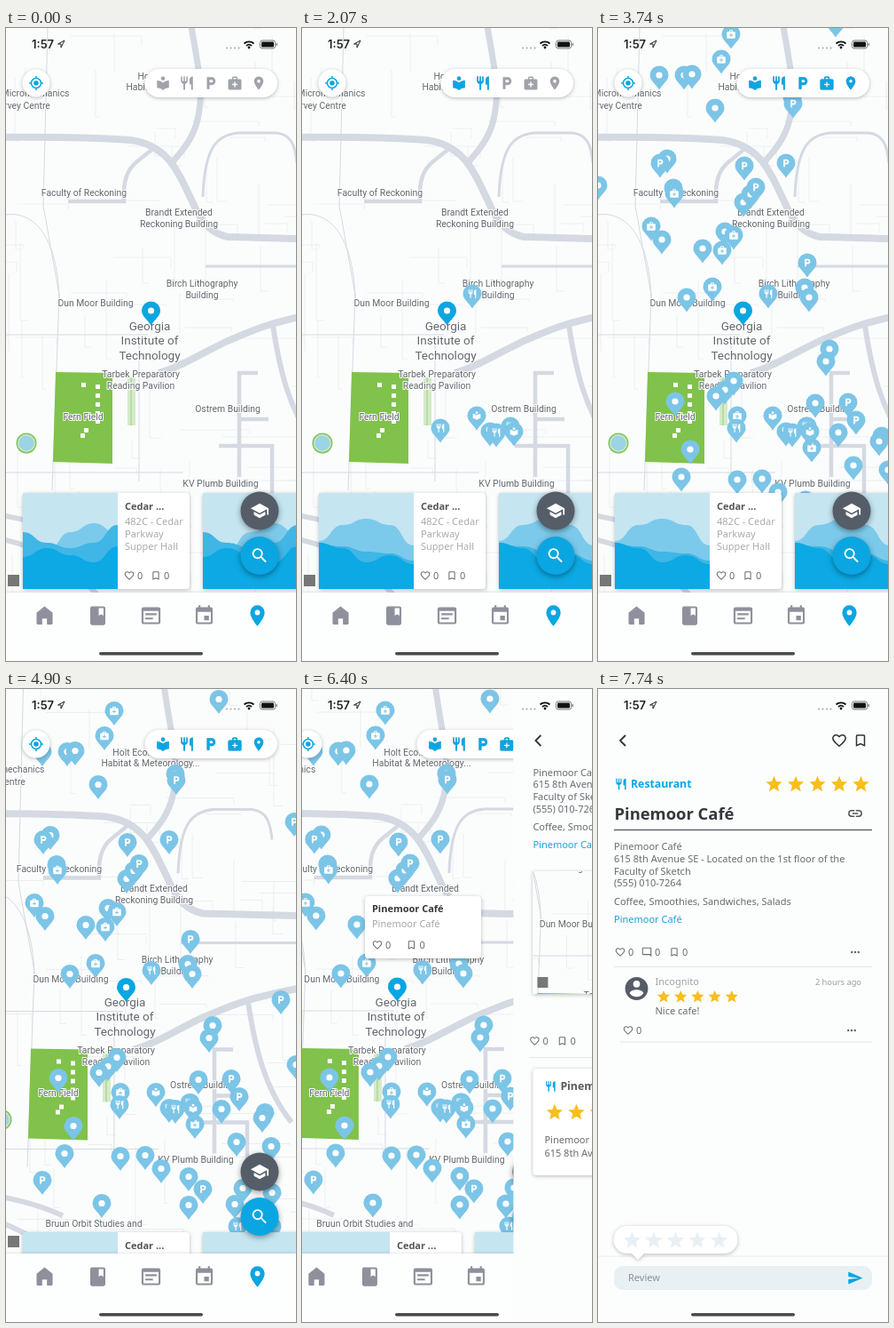
An HTML page for the animation above (8 s loop, 327 px wide and 712 px high).

```html
<!DOCTYPE html>
<html lang="en">
<head>
<meta charset="utf-8">
<title>Campus map</title>
<style>
html, body { margin: 0; height: 100%; overflow: hidden; background: #fbfdfd; }
svg { display: block; width: 100vw; height: 100vh; font: 11px "Noto Sans", "Open Sans", sans-serif; }
.map { font-family: Roboto, Arial, sans-serif; font-size: 10.4px; fill: #62676d; text-anchor: middle;
  paint-order: stroke; stroke: #fff; stroke-width: 2px; stroke-linejoin: round; }
.soft { filter: drop-shadow(0 1px 2px #0004); }
.fab { filter: drop-shadow(0 2px 3px #0006); }
</style>
</head>
<body>
<svg id="stage" viewBox="0 0 327 712" preserveAspectRatio="none"></svg>
<script>
const BLUE = '#0aa6e2', PALE = '#7cc5e7', GRAY = '#a0a3ab', TEXT = '#686b70', DARK = '#555d68', GOLD = '#f8be1b';

// Icons on a 24 unit grid
const ICONS = {
  lib: 'M12 11.5C9.6 9.3 6.5 8 3 8v11c3.5 0 6.6 1.3 9 3.5 2.4-2.2 5.5-3.5 9-3.5V8c-3.5 0-6.6 1.3-9 3.5zM12 8a3 3 0 1 0 0-6 3 3 0 0 0 0 6z',
  food: 'M11 9H9V2H7v7H5V2H3v7c0 2.1 1.7 3.8 3.8 4v9h2.5v-9C11.300 12.800 13 11.100 13 9V2h-2zm5-3v8h2.500v8H21V2c-2.800 0-5 2.200-5 4z',
  park: 'M13 3H6v18h4v-6h3a6 6 0 0 0 0-12zm.2 8H10V7h3.200a2 2 0 0 1 0 4z',
  med: 'M20 6h-4V4a2 2 0 0 0-2-2h-4a2 2 0 0 0-2 2v2H4a2 2 0 0 0-2 2v12a2 2 0 0 0 2 2h16a2 2 0 0 0 2-2V8a2 2 0 0 0-2-2zM10 4h4v2h-4zm6 11h-3v3h-2v-3H8v-2h3v-3h2v3h3z',
  place: 'M12 2a7 7 0 0 0-7 7c0 5.200 7 13 7 13s7-7.800 7-13a7 7 0 0 0-7-7zm0 9.500a2.500 2.500 0 1 1 0-5 2.500 2.500 0 0 1 0 5z',
  home: 'M12 2 3.500 9v11a1.500 1.500 0 0 0 1.500 1.500h4.500V15h5v6.500H19a1.500 1.500 0 0 0 1.500-1.500V9z',
  book: 'M18 2H6a2 2 0 0 0-2 2v16a2 2 0 0 0 2 2h12a2 2 0 0 0 2-2V4a2 2 0 0 0-2-2zm0 10-2.500-1.500L13 12V4h5z',
  note: 'M20 3H4a2 2 0 0 0-2 2v14a2 2 0 0 0 2 2h16a2 2 0 0 0 2-2V5a2 2 0 0 0-2-2zm0 16H4V7h16zM6 9.500h12v2H6zm0 4.500h8v2H6z',
  event: 'M17 12h-5v5h5zM16 1v2H8V1H6v2H5a2 2 0 0 0-2 2v14a2 2 0 0 0 2 2h14a2 2 0 0 0 2-2V5a2 2 0 0 0-2-2h-1V1zm3 18H5V8h14z',
  search: 'M15.500 14h-.8l-.3-.3a6.500 6.500 0 1 0-.7.7l.3.300v.8l5 5 1.500-1.500zm-6 0a4.500 4.500 0 1 1 0-9 4.500 4.500 0 0 1 0 9z',
  school: 'M5 13.200v4L12 21l7-3.800v-4L12 17zM12 3 1 9l11 6 9-4.900V17h2V9z',
  heart: 'M16.500 3A6 6 0 0 0 12 5.100 6 6 0 0 0 7.500 3C4.400 3 2 5.400 2 8.500c0 3.800 3.400 6.900 8.600 11.500l1.400 1.300 1.400-1.300C18.600 15.400 22 12.300 22 8.500 22 5.400 19.600 3 16.500 3zM12 18.700C7.100 14.200 4 11.400 4 8.500 4 6.500 5.500 5 7.500 5c1.500 0 3 1 3.600 2.400h1.800C13.500 6 15 5 16.500 5c2 0 3.500 1.500 3.500 3.500 0 2.900-3.100 5.700-8 10.200z',
  mark: 'M17 3H7a2 2 0 0 0-2 2v16l7-3 7 3V5a2 2 0 0 0-2-2zm0 15-5-2.200L7 18V5h10z',
  star: 'M12 17.300 18.200 21l-1.700-7L22 9.200l-7.200-.6L12 2 9.200 8.600 2 9.200 7.500 14l-1.700 7z',
  chat: 'M4 2h16a2 2 0 0 1 2 2v18l-4-4H4a2 2 0 0 1-2-2V4a2 2 0 0 1 2-2zm0 2v12h14.800l1.200 1.200V4z',
  link: 'M3.900 12A3.100 3.100 0 0 1 7 8.900h4V7H7a5 5 0 0 0 0 10h4v-1.900H7A3.100 3.100 0 0 1 3.900 12zM8 13h8v-2H8zm9-6h-4v1.900h4a3.100 3.100 0 0 1 0 6.200h-4V17h4a5 5 0 0 0 0-10z',
  more: 'M4 12a2 2 0 1 0 4 0 2 2 0 0 0-4 0zm6 0a2 2 0 1 0 4 0 2 2 0 0 0-4 0zm6 0a2 2 0 1 0 4 0 2 2 0 0 0-4 0z',
  user: 'M12 2a10 10 0 1 0 0 20 10 10 0 0 0 0-20zm0 3a3 3 0 1 1 0 6 3 3 0 0 1 0-6zm0 14.200c-2.500 0-4.700-1.300-6-3.200 0-2 4-3.100 6-3.100s6 1.100 6 3.100c-1.300 1.900-3.500 3.200-6 3.200z',
  send: 'M2 21 23 12 2 3v7l15 2-15 2z',
  edit: 'M3 17.200V21h3.800L17.800 9.900l-3.700-3.700zM20.700 7a1 1 0 0 0 0-1.400l-2.300-2.300a1 1 0 0 0-1.400 0l-1.900 1.800 3.800 3.800z'
};
const KINDS = ['lib', 'food', 'park', 'med', 'place'];

const icon = (name, x, y, size, fill = TEXT) =>
  `<path fill="${fill}" fill-rule="evenodd" transform="translate(${x - size / 2} ${y - size / 2}) scale(${size / 24})" d="${ICONS[name]}"/>`;
const text = (x, y, str, fill = TEXT, size = 11, extra = '') =>
  `<text x="${x}" y="${y}" fill="${fill}" font-size="${size}" ${extra}>${str}</text>`;
const bold = (x, y, str, fill, size) => text(x, y, str, fill, size, 'font-weight="700"');
const rect = (x, y, w, h, fill, r = 0, extra = '') =>
  `<rect x="${x}" y="${y}" width="${w}" height="${h}" rx="${r}" fill="${fill}" ${extra}/>`;
const circle = (x, y, r, fill, extra = '') => `<circle cx="${x}" cy="${y}" r="${r}" fill="${fill}" ${extra}/>`;
const line = (d, stroke, width) => `<path d="${d}" fill="none" stroke="${stroke}" stroke-width="${width}"/>`;
const group = (id, body, extra = '') => `<g id="${id}" ${extra}>${body}</g>`;
const lines = (x, y, step, rows, fill) => rows.map((row, i) => text(x, y + i * step, row, fill)).join('');
const stars = (x, y, gap, size, fill = GOLD) => [0, 1, 2, 3, 4].map(i => icon('star', x + i * gap, y, size, fill)).join('');
const count = (name, x, y) => icon(name, x, y, 12.500) + text(x + 9, y + 4, '0');
const likes = (x, y, gap) => count('heart', x, y) + count('mark', x + gap, y);
const fab = (x, y, r, fill, name) => circle(x, y, r, fill, 'class="fab"') + icon(name, x, y, 22, '#fff');

// Map
let seed = 11;
const rand = () => (seed = seed * 16807 % 2147483647) / 2147483647;
function streets() {
  let d = '';
  for (let i = 0; i < 95; i++) {
    const x = rand() * 390 - 30 | 0, y = rand() * 680 - 40 | 0, len = 20 + rand() * 70 | 0;
    d += `M${x} ${y}` + (rand() < .5 ? `h${len}v${rand() * 14 | 0}` : `v${len}h${rand() * 14 | 0}`);
  }
  return line(d, '#e8ebee', .8);
}
const road = (w, d) => line(d, '#d4d9e2', w);
const ROADS = [
  [8, 'M-20 123C60 122 110 124 140 126C185 132 195 165 210 195C220 220 232 231 250 235L370 238'],
  [7, 'M204 -40C210 20 224 60 218 92C214 125 196 140 187 152'],
  [3, 'M222 190C224 130 240 120 262 118H305C322 120 326 132 328 152M225 268H370'],
  [4.500, 'M70 195H133C132 175 135 160 148 150L168 134M284 388H263V505M240 470H300V530M263 440H296'],
  [8, 'M172 388C200 380 220 366 250 352C285 337 300 330 370 317'],
  [6, 'M301 335C308 380 318 430 350 470M-20 545C30 555 60 560 92 575M-20 572C30 580 70 600 110 645'],
  [1, 'M48 -40 42 200 60 300 52 520M0 210C40 205 60 250 60 310M0 345H160M150 350V510M0 500H200']
];
const LABELS = [
  [88, 189, 'Faculty of Reckoning'], [195, 211, 'Brandt Extended'], [195, 224, 'Reckoning Building'],
  [221, 291, 'Birch Lithography'], [221, 304, 'Building'], [101, 313, 'Dun Moor Building'],
  [152, 393, 'Tarbek Preparatory'], [152, 406, 'Reading Pavilion'], [87, 441, 'Fern Field'],
  [250, 432, 'Ostrem Building'], [242, 516, 'KV Plumb Building'], [127, 588, 'Bruun Orbit Studies and'],
  [172, 58, 'Holt Eco...'], [191, 70, 'Habitat &amp; Meteorology...'],
  [33, 77, 'Micromechanics'], [18, 91, 'Survey Centre']
];
const TITLE = ['Georgia', 'Institute of', 'Technology'];
const SQUARES = [[85, 399], [101, 401], [101, 411], [101, 421], [101, 431], [101, 440], [88, 450], [84, 456]];

const land = () => rect(-60, -60, 460, 800, '#fbfdfd') + streets() + ROADS.map(r => road(...r)).join('') +
  '<path d="M56 387 120 388 120 490 53 488z" fill="#80c24b"/>' +
  SQUARES.map(([x, y]) => rect(x, y, 5, 5, '#fff')).join('') +
  rect(137, 393, 9, 54, '#d5ebc8') + line('M141 393V447', '#b8dba6', 2) +
  circle(23, 467, 11.500, '#86c35c') + circle(23, 467, 10, '#c9e8cd') + circle(23, 467, 8.500, '#9bd4e4');
const labels = () => '<g class="map">' + LABELS.map(([x, y, s]) => `<text x="${x}" y="${y}">${s}</text>`).join('') +
  TITLE.map((s, i) => `<text x="162" y="${339.500 + i * 16.500}" font-size="13.500">${s}</text>`).join('') + '</g>';

const PINS = {
  place: [69,54, 97,54, 106,53, 132,91, 0,178, 78,148, 85,181, 164,197, 172,188, 118,249, 72,239, 143,230, 100,304,
    233,293, 238,304, 261,362, 257,376, 87,421, 153,398, 143,408, 133,415, 104,475, 94,506, 157,509, 185,508, 203,523,
    245,423, 271,456, 320,460, 317,466, 288,493, 327,498, 268,-5, 219,79, 136,562, 234,532, 234,564, 295,545, 286,563,
    328,550, 328,588, 355,406, 236,449],
  med: [150,8, 139,36, 86,187, 60,224, 153,234, 140,251, 129,292, 241,473, 157,437],
  park: [220,86, 212,153, 165,156, 70,153, 178,180, 236,265, 291,442, 282,422, 338,333, 69,536, 250,546, 353,133],
  food: [192,300, 156,451, 212,455, 219,456, 235,449, 289,588],
  lib: [197,437, 239,455]
};
function pin(x, y, kind, fill = PALE) {
  const mark = kind === 'place' ? circle(0, -1, 3.600, '#fff') : icon(kind, 0, -1, 11.500, '#fff');
  return `<g transform="translate(${x} ${y})"><path fill="${fill}" d="M0 15.500C-4 9 -10.500 5 -10.500 -1A10.500 10.500 0 1 1 10.500 -1C10.500 5 4 9 0 15.500z"/>${mark}</g>`;
}
function pinLayer(kind) {
  let out = '';
  const p = PINS[kind];
  for (let i = 0; i < p.length; i += 2) out += pin(p[i], p[i + 1], kind);
  return group('pins-' + kind, out);
}

const pill = (y, iconOf) => rect(156.500, y - 16, 149.500, 32, '#fff', 16, 'class="soft"') +
  KINDS.map((k, i) => iconOf(k, 177 + i * 27, y)).join('');

// Home view
const picture = x => `<g transform="translate(${x} 523)">` + rect(0, 0, 107, 108, '#c5e5f1') +
  ['#7ccaeb', '#3fb6e6', '#0ca9e4'].map(c => `<path class="wave" fill="${c}"/>`).join('') + '</g>';
const cards = () => rect(19, 523, 188, 108, '#fff', 4, 'class="soft"') + picture(19) +
  bold(134, 542, 'Cedar ...', '#50545a', 11) + lines(134, 559, 14, ['482C - Cedar', 'Parkway', 'Supper Hall'], '#a9abae') +
  likes(139, 616, 30) + rect(222, 523, 188, 108, '#fff', 4, 'class="soft"') + picture(222);
const tabs = () => rect(0, 635, 327, 77, '#fdfefe', 0, 'class="soft"') +
  ['home', 'book', 'note', 'event', 'place'].map((n, i) =>
    icon(n, 43.500 + i * 60, 661, n === 'place' ? 28 : 25.500, n === 'place' ? BLUE : '#8e909b')).join('');
const locate = () => circle(34, 62, 15.500, '#fff', 'class="soft"') + circle(34, 62, 2.800, BLUE) +
  circle(34, 62, 5.500, 'none', `stroke="${BLUE}" stroke-width="1.500"`) +
  line('M34 54v3M34 67v3M26 62h3M39 62h3', BLUE, 1.500);
const popup = () => rect(98, 233, 131, 70, '#fff', 4, 'class="soft"') + bold(106, 251, 'Pinemoor Café', '#34373b', 11) +
  text(106, 268, 'Pinemoor Café', '#a4a6aa') + likes(112, 288, 38.500);

const homeView = () =>
  group('map', group('land', land()) + group('labels', labels()) +
    [...KINDS].reverse().map(pinLayer).join('') + pin(163.500, 319, 'place', BLUE)) +
  rect(2, 615, 13, 13, '#777') + group('cards', cards()) + tabs() + locate() +
  pill(62, (k, x, y) => icon(k, x, y, 18, GRAY) + group('on-' + k, icon(k, x, y, 18, BLUE))) +
  fab(286, 543, 21.500, DARK, 'school') + fab(286, 593.500, 21.500, BLUE, 'search') + group('popup', popup());

// Place view
const ADDRESS = '615 8th Avenue SE - Located on the 1st floor of the';
const about = (x, y) => lines(x, y, 13.800, ['Pinemoor Café', ADDRESS, 'Faculty of Sketch', '(555) 010-7264']) +
  text(x, y + 61.500, 'Coffee, Smoothies, Sandwiches, Salads') + text(x, y + 81.500, 'Pinemoor Café', '#1aa4dd');
const header = () => line('M31 52 25 58 31 64', '#333', 1.800) + icon('heart', 272, 58, 19, '#333') + icon('mark', 296, 58, 18, '#333');
const placeView = () => rect(0, 0, 327, 712, '#fcfdfd') + header() +
  text(163.500, 63, 'Pinemoor Café', '#484b50', 13.700, 'text-anchor="middle"') + about(22, 97.500) +
  rect(22, 205, 284, 138, '#fff', 0, 'class="soft"') +
  '<g clip-path="url(#mini)"><g transform="translate(-29 -45)"><use href="#land"/><use href="#labels"/>' +
  '<text class="map" x="119" y="250">Drafting Foundations</text>' + pin(192, 302, 'place', BLUE) + '</g></g>' +
  rect(27, 324, 12, 12, '#777') + likes(24, 396, 31) +
  pill(388, (k, x, y) => icon(k, x, y, 18, k === 'food' ? BLUE : GRAY)) + line('M18 414.500H309', '#e4e7ea', 1) +
  rect(128, 546, 65, 4, '#e2e5e8', 2) + rect(22, 427, 284, 120, '#fff', 4, 'class="soft"') +
  icon('food', 42, 447, 14, BLUE) + bold(53, 451, 'Pinemoor Café', '#565a60', 12.300) + stars(46.500, 476, 24.500, 22) +
  lines(35, 511, 15, ['Pinemoor Café', ADDRESS]) + fab(286, 625.500, 21.500, BLUE, 'search') +
  rect(125, 642.500, 77, 28.500, DARK, 14, 'class="fab"') + icon('edit', 146, 657, 11, '#fff') +
  text(156, 661, 'Serve', '#fff', 10.300, 'font-weight="600"');

// Review view
const reviewView = () => rect(0, 0, 327, 712, '#fcfdfd') + header() + icon('food', 26, 107, 15, BLUE) +
  bold(37, 111, 'Restaurant', BLUE, 12.300) + stars(198.500, 107, 24.500, 22) + bold(18.500, 146.500, 'Pinemoor Café', '#34383d', 18.400) +
  icon('link', 290, 140, 19, '#555') + line('M18 158.500H309', '#5f646a', 1.400) + about(18, 181) +
  count('heart', 25, 296) + count('chat', 55, 296) + count('mark', 86, 296) + icon('more', 290, 296, 15) +
  line('M18 312.500H309', '#e2e5e8', 1) + icon('user', 43.500, 337, 31, DARK) + text(64.500, 333, 'Incognito', '#a0a2a6') +
  text(297, 333, '2 hours ago', '#9a9da1', 9.300, 'text-anchor="end"') + stars(74, 346, 19.200, 17) +
  text(64.500, 366, 'Nice cafe!') + count('heart', 34, 384) + icon('more', 286, 384, 15) + line('M25 397H309', '#e2e5e8', 1) +
  line('M0 638H327', '#eceff1', 1) +
  '<path class="soft" fill="#fff" d="M33 604H142a15.500 15.500 0 0 1 0 31H52L45 642 38 635H33a15.500 15.500 0 0 1 0-31z"/>' +
  stars(38.500, 620, 24.500, 23, '#e8f0f5') + rect(18, 649, 291, 27, '#e9f0f4', 10) +
  text(34, 666, 'Review', '#8b8f94') + icon('send', 290, 662.500, 18.500, BLUE);

const status = () => text(29, 23, '1:57', '#222', 13, 'font-family="Inter, Arial, sans-serif" font-weight="600"') +
  line('M66 14 58.500 18H62V22z', '#222', 1) + [249, 253.500, 258, 262.500].map(x => circle(x, 22.500, 1, '#aaa')).join('') +
  line('M268.500 17.500a8 8 0 0 1 11 0M271 20a4.500 4.500 0 0 1 6 0', '#111', 1.800) + circle(274, 22, 1.400, '#111') +
  rect(286.500, 14, 17, 9, 'none', 2.500, 'stroke="#777"') + rect(288, 15.500, 14, 6, '#111', 1.200) + rect(304.500, 17, 1.500, 3, '#777', .7) +
  rect(105, 702, 117, 3.600, '#4b4b4d', 1.800);

document.getElementById('stage').innerHTML =
  '<clipPath id="mini"><rect x="22" y="205" width="284" height="138"/></clipPath>' +
  group('home', homeView()) + group('place', placeView()) + group('review', reviewView()) + status();

// Motion
const $ = id => document.getElementById(id);
const ramp = (t, from, to) => Math.max(0, Math.min(1, (t - from) / (to - from)));
const ease = p => 1 - (1 - p) ** 3;
const mix = (a, b, p) => a + (b - a) * p;
const move = (id, x, y = 0) => $(id).setAttribute('transform', `translate(${x} ${y})`);
const fade = (id, p) => {
  $(id).style.opacity = p;
  $(id).style.display = p > 0 ? '' : 'none';
};
const TAPS = { lib: 600, food: 1500, park: 2150, med: 2820, place: 3520 };
const WAVES = [
  [[60, 66, 44, 34, 46], [54, 36, 29, 36, 59]],
  [[44, 56, 62, 56, 36], [58, 60, 66, 68, 76]],
  [[72, 62, 70, 78, 60], [56, 62, 78, 70, 80]]
];
const waves = [...document.querySelectorAll('.wave')];

function wavePath(from, to, p) {
  const ys = from.map((y, i) => mix(y, to[i], p));
  const step = 107 / 4;
  let d = `M0 ${ys[0]}`;
  for (let i = 1; i < 5; i++) d += `C${(i - .5) * step} ${ys[i - 1]} ${(i - .5) * step} ${ys[i]} ${i * step} ${ys[i]}`;
  return d + 'V108H0z';
}

function draw(now) {
  const t = now % 8000;
  const swell = ramp(t, 70, 820);
  waves.forEach((w, i) => w.setAttribute('d', wavePath(...WAVES[i % 3], swell)));
  for (const kind of KINDS) {
    fade('on-' + kind, ramp(t, TAPS[kind], TAPS[kind] + 100));
    fade('pins-' + kind, ramp(t, TAPS[kind], TAPS[kind] + 200));
  }
  const drift = ramp(t, 4900, 5150);
  move('map', t < 4900 ? 0 : mix(-28, -29, drift), t < 4900 ? 0 : mix(17.500, 17, drift));
  move('cards', 0, t < 4740 ? 0 : t < 4900 ? 30 : 88);
  fade('popup', ramp(t, 5300, 5560));

  const push = ease(ramp(t, 6370, 6680));
  move('home', -100 * push);
  move('place', 327 * (1 - push));
  fade('home', push < 1 ? 1 : 0);
  // the small map borrows shapes from the home view, so only hide that view by opacity
  $('home').style.display = '';
  fade('place', push > 0 ? 1 : 0);
  fade('review', ramp(t, 7400, 7740));
  requestAnimationFrame(frame);
}
const frame = () => draw(performance.now());
frame();
</script>
</body>
</html>
```
